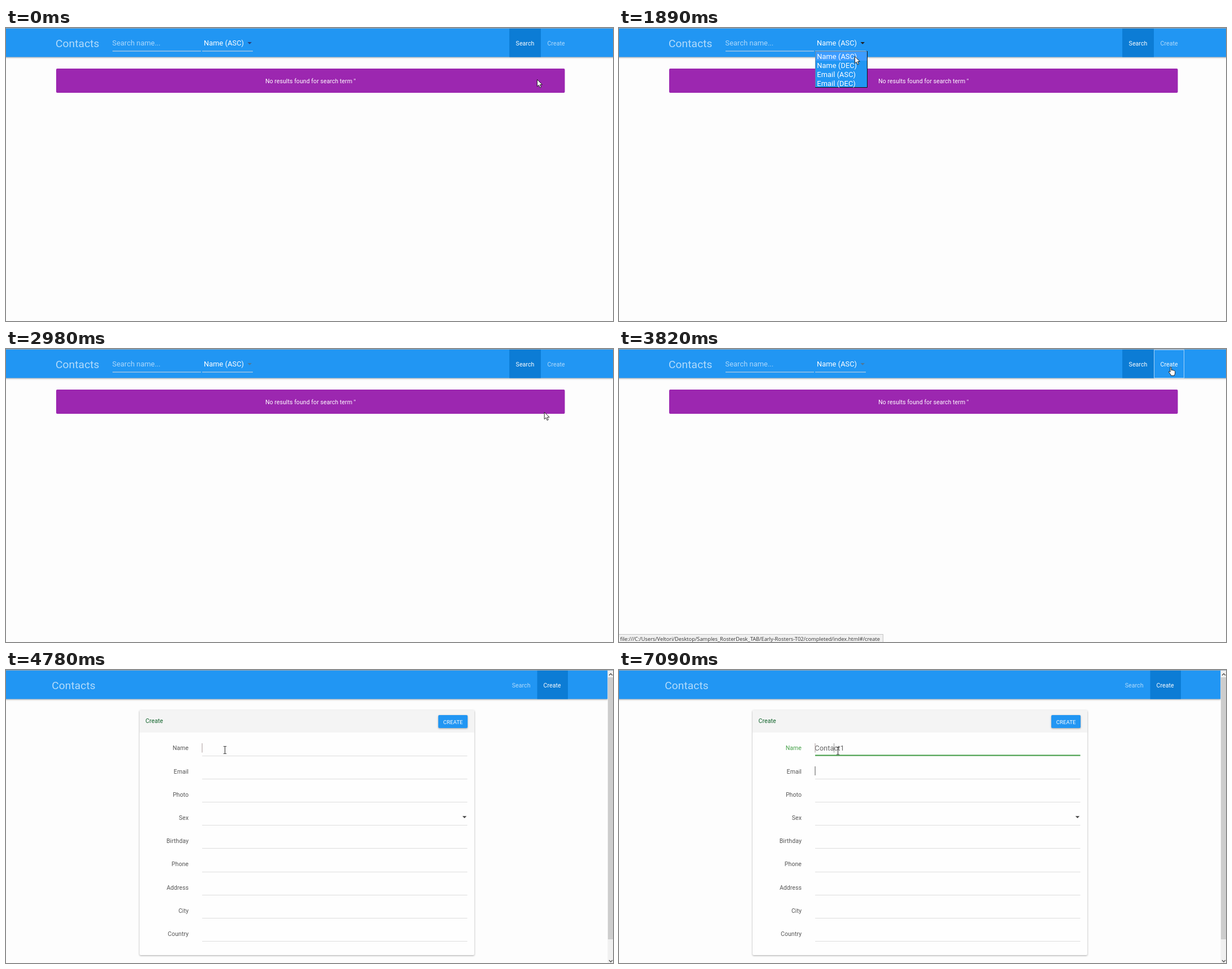
An HTML page for the animation above (8 s loop, 1077x520 px).

```html
<!DOCTYPE html>
<html lang="en">
<head>
<meta charset="utf-8">
<title>Contact list</title>
<style>
html, body { margin: 0; width: 100%; height: 100%; overflow: hidden; background: #fdfdfd; }
svg { display: block; width: 1077px; height: 520px; }
text { font: 10.5px Roboto, Arial, sans-serif; letter-spacing: .08px; white-space: pre; }
.brand { font-size: 19.2px; fill: #b2dbfb; }
.field { font-size: 12.8px; }
.system { font: 9.3px "Open Sans", "Noto Sans", sans-serif; letter-spacing: 0; }
.link { fill: #b2dbfb; }
.on { fill: #fff; }
.label { fill: #555; text-anchor: end; }
.rule { fill: #ddd; }
.shadow { filter: drop-shadow(0 1px 1.5px rgba(0, 0, 0, .35)); }
.ring { fill: none; stroke: #a9d3f7; }
</style>
</head>
<body>
<svg viewBox="0 0 1077 520">
  <rect width="1077" height="520" fill="#fdfdfd"/>
  <rect id="bar" class="shadow" x="-5" width="1087" height="51.5" fill="#2196f3"/>

  <g id="listPage">
    <text class="brand" x="88" y="33.5">Contacts</text>
    <text class="field" x="188.5" y="31.3" fill="#acd8fb">Search name...</text>
    <rect class="rule" x="189" y="40.5" width="157" height="1"/>
    <text class="field on" x="351" y="31.3">Name (ASC)</text>
    <rect class="rule" x="348" y="40.5" width="90" height="1"/>
    <path id="arrow" d="M428.5 25h7.5l-3.75 3.8z"/>
    <rect x="893" y="1" width="56" height="50.5" fill="#0c7cd5"/>
    <text class="on" x="904.6" y="30.7">Search</text>
    <text id="createLink" class="link" x="960.6" y="30.7">Create</text>
    <rect id="listRing" class="ring" x="949.5" y="1.5" width="53" height="50"/>
    <rect x="89" y="72" width="902.5" height="43" rx="2" fill="#9c27b0"/>
    <text class="on" x="540.3" y="97.7" text-anchor="middle">No results found for search term ''</text>
    <g id="menu">
      <rect x="348.5" y="41.5" width="92" height="64" fill="#2196f3" stroke="#5f86a8"/>
      <rect id="hover" x="349" width="91" height="16" fill="#3d9cff"/>
      <path d="M348 105.5h92.5V41" fill="none" stroke="#111"/>
    </g>
  </g>

  <g id="formPage">
    <text class="brand" x="81.2" y="33.5">Contacts</text>
    <rect id="oldTab" x="886" y="1" width="56" height="50.5" fill="#0c7cd5"/>
    <rect x="942.5" y="1" width="54.5" height="50.5" fill="#0c7cd5"/>
    <text class="link" x="897.8" y="30.7">Search</text>
    <text class="on" x="953.6" y="30.7">Create</text>
    <rect id="formRing" class="ring" x="943.5" y="1.5" width="52" height="49"/>
    <g class="shadow">
      <rect x="237" y="71.5" width="594" height="434.5" rx="2" fill="#fefefe"/>
      <path d="M237 111V73.500q0-2 2-2H829q2 0 2 2V111z" fill="#f4f4f4"/>
    </g>
    <text x="247.600" y="93.700" fill="#0d6128">Create</text>
    <rect class="shadow" x="767" y="80" width="52" height="23" rx="2" fill="#2196f3"/>
    <text class="on" x="793.2" y="96" style="font-size:9.6px" text-anchor="middle">CREATE</text>
    <g id="fields"></g>
    <path d="M809.800 259.200h7.400l-3.700 3.800z" fill="#444"/>
    <rect id="focusRule" x="348" y="150.500" width="470.500" height="2" fill="#43a047"/>
    <text id="typed" class="field" x="347.300" y="143.300" fill="#666"></text>
    <g id="popup">
      <rect x="353.500" y="157" width="467" height="12.500" fill="#8c8c8c"/>
      <rect x="348.500" y="152.500" width="470" height="15" fill="#fff" stroke="#8a8a8a"/>
      <text id="hint" class="system" x="356.500" y="164">Contact1</text>
    </g>
    <rect id="homeCaret" x="347.500" y="130" width="1" height="16.500" fill="#a99"/>
    <rect id="caret" y="130" width="1" height="16.500" fill="#999"/>
    <rect id="mailCaret" x="347.500" y="171" width="1" height="16" fill="#555"/>
    <rect x="1067.500" y="1" width="9.500" height="519" fill="#f0f0f0"/>
    <rect x="1068" y="13" width="9" height="465" fill="#cdcdcd"/>
    <path d="M1070 9.500l3-3 3 3M1070 515l3 3 3-3" fill="none" stroke="#505050" stroke-width="1.400"/>
  </g>

  <g id="status">
    <rect x="-.5" y="506.500" width="469" height="14" fill="#f1f1f1" stroke="#c4c4c4"/>
    <text id="path" class="system" x="2" y="518.400" fill="#333"></text>
  </g>
  <rect width="1077" height="1" fill="#9aa9b5"/>

  <g id="pointer" fill="#fff" stroke="#111" stroke-width=".9" stroke-linejoin="round">
    <path id="plain" d="M.5.5v12.300l2.900-2.600 2 4.600 2.100-.9-2-4.500h3.900z"/>
    <path id="hand" d="M2 1.500q1-1.700 2 0v5l2-.2q1 .1 1.200.8l1.400-.1q.8.200.9.900l.7.100q.8.400.6 1.400l-.4 4-1.200 2.800h-5.600l-1-2.200-3.200-4q-.4-1.400.9-1.300l1.700 1.400z"/>
    <path id="beam" d="M-2.500-6.500h2l.5.500.5-.5h2M0-6V6M-2.500 6.500h2L0 6l.5.500h2" fill="none"/>
  </g>
</svg>
<script>
const LOOP = 8000;
const el = {};
document.querySelectorAll("[id]").forEach(n => el[n.id] = n);

function add(parent, tag, attrs, text = "") {
  const node = document.createElementNS(parent.namespaceURI, tag);
  for (const key in attrs) node.setAttribute(key, attrs[key]);
  node.textContent = text;
  parent.append(node);
  return node;
}

["Name (ASC)", "Name (DEC)", "Email (ASC)", "Email (DEC)"].forEach((name, i) =>
  add(el.menu, "text", { class: "field on", x: 351.3, y: 54.8 + i * 15.9 }, name));

const labels = ["Name", "Email", "Photo", "Sex", "Birthday", "Phone", "Address", "City", "Country"]
  .map((name, i) => {
    const y = i * 41.2;
    add(el.fields, "rect", { class: "rule", x: 348, y: Math.round(151.5 + y), width: 470.5, height: 1 });
    return add(el.fields, "text", { class: "label", x: 324, y: 142.3 + y }, name);
  });

el.path.textContent = ["file:", "", "", "C:", "Users", "Veltori", "Desktop",
  "Samples_RosterDesk_TAB", "Early-Rosters-T02", "completed", "index.html#", "create"].join("/");

// Screen refreshes: first time, last time, number of steps
const bursts = [[70, 810, 10], [880, 1510, 9], [1660, 2430, 11], [2510, 2660, 3],
  [2830, 3590, 11], [3670, 4460, 11], [4540, 4780, 4], [5000, 5000, 1],
  [5790, 6010, 4], [6160, 6240, 2], [6860, 6860, 1], [7090, 7090, 1]];

function snap(t) {
  const burst = bursts.filter(b => b[0] <= t).pop();
  if (!burst) return 0;
  const [from, to, count] = burst;
  if (t >= to) return to;
  const step = (to - from) / (count - 1);
  return from + Math.floor((t - from) / step + .15) * step;
}

// Pointer route: time, x, y
const route = [[0, 942, 91], [70, 936, 90], [300, 790, 76], [560, 600, 62], [810, 497, 60],
  [1040, 450, 38], [1270, 431, 29], [1510, 430, 30], [1740, 424, 40], [1890, 418, 50],
  [2050, 416, 64], [2230, 416, 84], [2430, 424, 116], [2510, 434, 130], [2660, 448, 147],
  [2830, 680, 140], [2980, 954, 112], [3140, 1012, 88], [3370, 994, 48], [3590, 976, 31],
  [4200, 976, 31], [4460, 740, 66], [4620, 440, 124], [4780, 388.5, 142], [5000, 388.5, 143.5]];

function locate(t) {
  const i = route.findIndex(p => p[0] > t);
  if (i < 0) return route[route.length - 1].slice(1);
  const [a, b] = [route[i - 1], route[i]];
  const k = (t - a[0]) / (b[0] - a[0]);
  return [1, 2].map(j => a[j] + (b[j] - a[j]) * k);
}

const keys = [5790, 5930, 6000, 6150, 6230];
const caretX = [347.5, 355.5, 363, 370.5, 375, 381];

const show = (node, on) => { node.style.display = on ? "" : "none"; };

function draw(time) {
  const t = snap(time);
  const within = (a, b) => t >= a && t < b;
  const [x, y] = locate(t);
  const form = t >= 3900;

  show(el.listPage, !form);
  show(el.formPage, form);
  el.bar.setAttribute("width", form ? 1072.5 : 1087);

  const open = within(1420, 2580);
  show(el.menu, open);
  const row = Math.max(0, Math.min(3, Math.floor((y - 42) / 16)));
  el.hover.setAttribute("y", 42 + row * 15.9);
  el.arrow.setAttribute("fill", t < 1300 ? "#2b3f78" : t < 2800 ? "#222" : "#4e7899");
  el.createLink.setAttribute("class", t >= 3430 ? "on" : "link");
  show(el.listRing, t >= 3810);

  show(el.status, within(3740, 4050));
  el.status.setAttribute("opacity", form ? .22 : 1);
  el.oldTab.setAttribute("opacity", t < 3950 ? .5 : t < 4050 ? .12 : 0);
  show(el.formRing, t < 4680);

  const count = t >= 7090 ? 8 : keys.filter(k => k <= t).length;
  el.typed.textContent = "Contact1".slice(0, count);
  el.caret.setAttribute("x", caretX[Math.min(count, 5)]);
  show(el.caret, count > 0);
  show(el.homeCaret, t >= 4770);
  show(el.mailCaret, t >= 7090);
  show(el.popup, within(5790, 7090));
  el.hint.setAttribute("fill", t >= 6860 ? "#777" : "#111");
  const valid = t >= 5855;
  show(el.focusRule, valid);
  labels[0].style.fill = valid ? "#43a047" : "";

  const kind = within(3430, 4250) ? "hand" : t >= 4650 ? "beam" : "plain";
  ["plain", "hand", "beam"].forEach(k => show(el[k], k === kind));
  el.pointer.setAttribute("transform", `translate(${x} ${y})`);
}

function tick() {
  draw(performance.now() % LOOP);
  requestAnimationFrame(tick);
}
tick();
</script>
</body>
</html>
```
